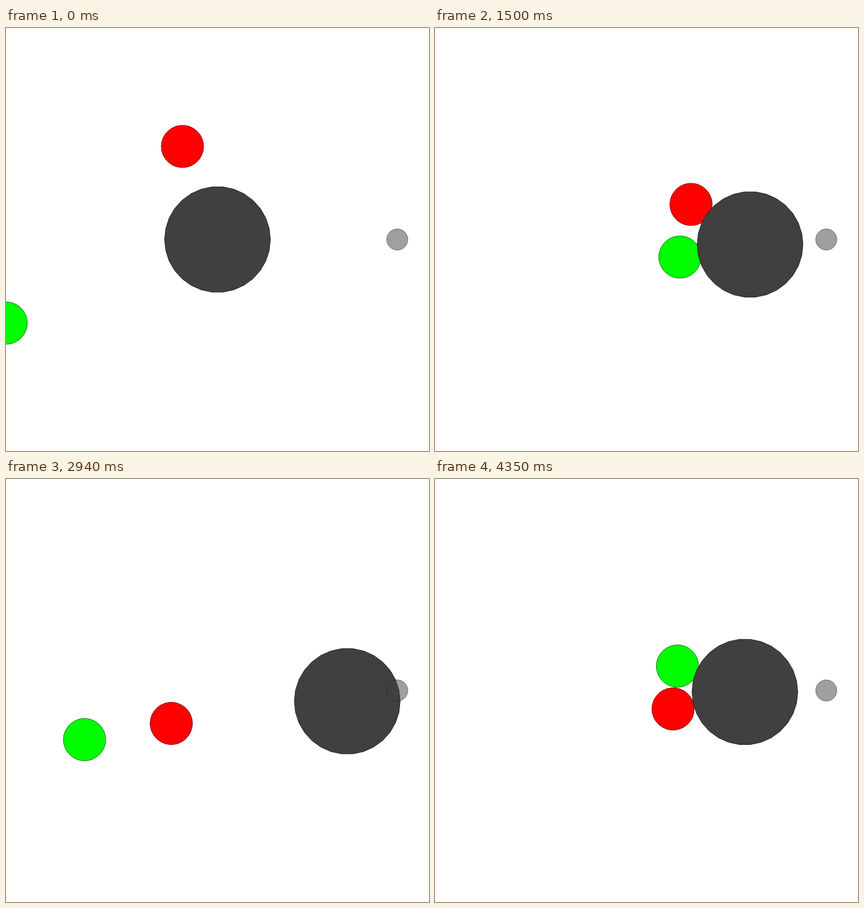
Write an HTML page that moves like this. It is 700 px wide and 700 px high and loops after 4380 ms.

```html
<!DOCTYPE html>
<html lang="en">
<head>
<meta charset="utf-8">
<title>Two discs push a ball</title>
<style>
  html, body { margin: 0; width: 100%; height: 100%; overflow: hidden; background: #fff; }
  svg { display: block; width: 100%; height: 100%; }
</style>
</head>
<body>
<svg id="stage" viewBox="0 0 700 700"></svg>
<script>
const STEP = 30, COUNT = 146;
const stage = document.getElementById('stage');

// Each disc is a 30-sided polygon with an outline at half brightness.
function disc(radius, fill, line, alpha = 1) {
  const el = document.createElementNS('http://www.w3.org/2000/svg', 'polygon');
  const points = Array.from({ length: 30 }, (_, i) => {
    const a = i * Math.PI / 15;
    return (radius * Math.cos(a)).toFixed(2) + ',' + (radius * Math.sin(a)).toFixed(2);
  });
  const attrs = {
    points: points.join(' '), fill, stroke: line, 'stroke-width': 1,
    'fill-opacity': alpha, 'stroke-opacity': alpha
  };
  for (const name in attrs) el.setAttribute(name, attrs[name]);
  stage.append(el);
  return el;
}

function place(el, [x, y]) {
  el.setAttribute('transform', `translate(${x.toFixed(2)} ${y.toFixed(2)})`);
}

// Monotone cubic through keys [step, a, b], held still outside them.
function follow(keys, t) {
  const last = keys.length - 1;
  if (t <= keys[0][0]) return keys[0].slice(1);
  if (t >= keys[last][0]) return keys[last].slice(1);
  let i = 0;
  while (keys[i + 1][0] < t) i++;
  const h = keys[i + 1][0] - keys[i][0], u = (t - keys[i][0]) / h, v = 1 - u;
  return [1, 2].map(k => {
    const slope = j => (keys[j + 1][k] - keys[j][k]) / (keys[j + 1][0] - keys[j][0]);
    const tangent = j => {
      const a = slope(Math.max(j - 1, 0)), b = slope(Math.min(j, last - 1));
      return a * b > 0 ? 2 * a * b / (a + b) : 0;
    };
    return v * v * (1 + 2 * u) * keys[i][k] + u * v * v * h * tangent(i)
         + u * u * (3 - 2 * u) * keys[i + 1][k] - u * u * v * h * tangent(i + 1);
  });
}

// Distance covered from rest when each step keeps 3/4 of the speed and adds a constant push.
const run = n => n - 3 * (1 - 0.75 ** n);

function glide(from, to, begin, end, t) {
  const p = run(t - begin) / run(end - begin);
  return from.map((c, i) => c + (to[i] - c) * p);
}

// Ball keys are [step, x, y]; push keys are [step, degrees above the ball's left side, gap].
const rounds = [
  {
    begin: 0, touch: 14,
    ball: [[0, 350, 350], [14, 350, 350], [35, 457, 352], [54, 533, 360], [67, 555, 364.5], [74, 564.7, 367.8]],
    red: {
      from: [292, 196],
      push: [[14, 11.7, 118], [35, 24.3, 118.5], [54, 35, 118], [67, 24, 118.2]],
      leave: 86, to: [273.5, 404.5]
    },
    green: {
      from: [0.3, 488.3],
      push: [[14, -30, 130.6], [35, -12.5, 115], [67, -9.1, 125], [84, -22, 138]],
      leave: 84, to: [130, 431.3]
    }
  },
  {
    begin: 101, touch: 108,
    ball: [[101, 350, 350], [105, 350, 350], [120, 407.5, 346.4], [126, 438, 347], [145, 512.8, 352.4]],
    red: { from: [160, 398], push: [[120, -9.9, 119.8], [145, -13.3, 122.1]] },
    green: { from: [182, 230.5], push: [[120, 22, 120.8], [145, 21, 119.5]] }
  }
];
const FAR = 98; // step at which leaving discs reach their "to" point

function beside(round, disc, t) {
  const [x, y] = follow(round.ball, t), [deg, gap] = follow(disc.push, t);
  const a = deg * Math.PI / 180;
  return [x - gap * Math.cos(a), y - gap * Math.sin(a)];
}

function position(round, disc, t) {
  const { begin, touch } = round, { from, leave, to } = disc;
  if (t < touch) return glide(from, beside(round, disc, touch), begin, touch, t);
  if (t > leave) return glide(beside(round, disc, leave), to, leave, FAR, t);
  return beside(round, disc, t);
}

const red = disc(35, '#f00', '#800000');
const green = disc(35, '#0f0', '#008000');
const ball = disc(87.5, '#404040', '#202020');
const goal = disc(17.5, '#404040', '#202020', 0.5);
place(goal, [647.5, 350]);

function draw(ms) {
  const t = Math.floor(ms / STEP) % COUNT;
  const round = rounds[t < rounds[1].begin ? 0 : 1];
  place(red, position(round, round.red, t));
  place(green, position(round, round.green, t));
  place(ball, follow(round.ball, t));
}

const start = performance.now();
function tick(now) {
  draw(Math.max(0, now - start));
  requestAnimationFrame(tick);
}
draw(0);
requestAnimationFrame(tick);
</script>
</body>
</html>
```
